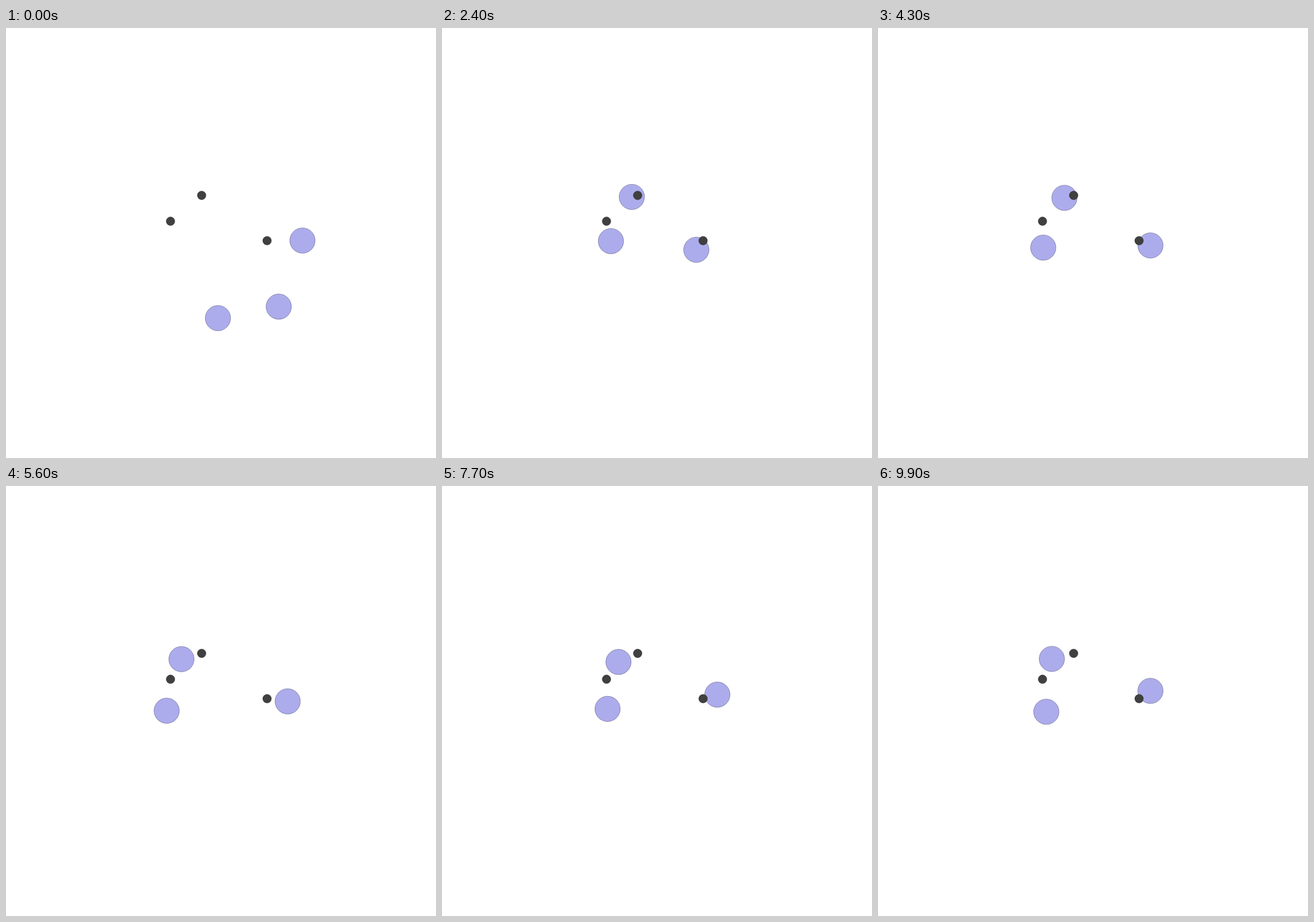
Animation of 700x700 px, one loop 10000 ms. Source, as an HTML page with a canvas:

```html
<!DOCTYPE html>
<html lang="en">
<head>
<meta charset="utf-8">
<title>Three agents, three landmarks</title>
<style>
html, body { margin: 0; width: 100%; height: 100%; overflow: hidden; background: #fff; }
canvas { display: block; }
</style>
</head>
<body>
<canvas id="stage" width="700" height="700"></canvas>
<script>
const ctx = document.getElementById('stage').getContext('2d');
const STEP = 100, STEPS = 100, TENSION = 0.5;

const landmarks = [[318.5, 272.5], [267.8, 314.6], [425, 346.2]];

// Each agent passes its stops at these steps
const stops = [0, 11, 24, 43, 68, 85, 99];
const agents = [
  { x: [345, 266, 275, 269, 275, 265, 274], y: [472.3, 361, 347, 357.5, 353.5, 371, 367.5], sway: [-0.6, 0.6] },
  { x: [444, 330, 309, 303.5, 272, 301, 283], y: [453.6, 293, 275, 276.5, 292.5, 280.5, 281.5], sway: [0, -0.2] },
  { x: [482.6, 429.5, 414, 443.5, 437.5, 457, 443.5], y: [346, 363, 361, 354, 347, 333.5, 333.5], sway: [1, 0] }
];

// Speed at a stop, zero at both ends of the path
function speed(values, i) {
  if (i === 0 || i === stops.length - 1) return 0;
  return TENSION * (values[i + 1] - values[i - 1]) / (stops[i + 1] - stops[i - 1]);
}

function glide(values, i, u) {
  const h = stops[i + 1] - stops[i], v = 1 - u;
  return values[i] * (1 + 2 * u) * v * v + values[i + 1] * (1 + 2 * v) * u * u
    + h * u * v * (speed(values, i) * v - speed(values, i + 1) * u);
}

// Smooth travel plus a sway on every other leg that calms down with time
function place(agent, step) {
  const i = stops.findLastIndex((s, n) => s <= step && n < stops.length - 1);
  const u = (step - stops[i]) / (stops[i + 1] - stops[i]);
  const swing = i % 2 * (36 - 6 * i) * Math.sin(Math.PI * u) ** 2;
  return [
    glide(agent.x, i, u) + swing * agent.sway[0],
    glide(agent.y, i, u) + swing * agent.sway[1]
  ];
}

function disc([x, y], r, fill, line) {
  ctx.beginPath();
  ctx.arc(x, y, r, 0, Math.PI * 2);
  ctx.fillStyle = fill;
  ctx.strokeStyle = line;
  ctx.fill();
  ctx.stroke();
}

function draw(time) {
  const step = Math.floor(time / STEP) % STEPS;
  ctx.fillStyle = '#fff';
  ctx.fillRect(0, 0, 700, 700);
  for (const agent of agents) disc(place(agent, step), 20.6, '#acacec', 'rgba(45, 45, 90, 0.42)');
  for (const spot of landmarks) disc(spot, 7, '#404040', 'rgba(32, 32, 32, 0.5)');
}

let start;
function tick(now) {
  start ??= now;
  draw(now - start);
  requestAnimationFrame(tick);
}
draw(0);
requestAnimationFrame(tick);
</script>
</body>
</html>
```
